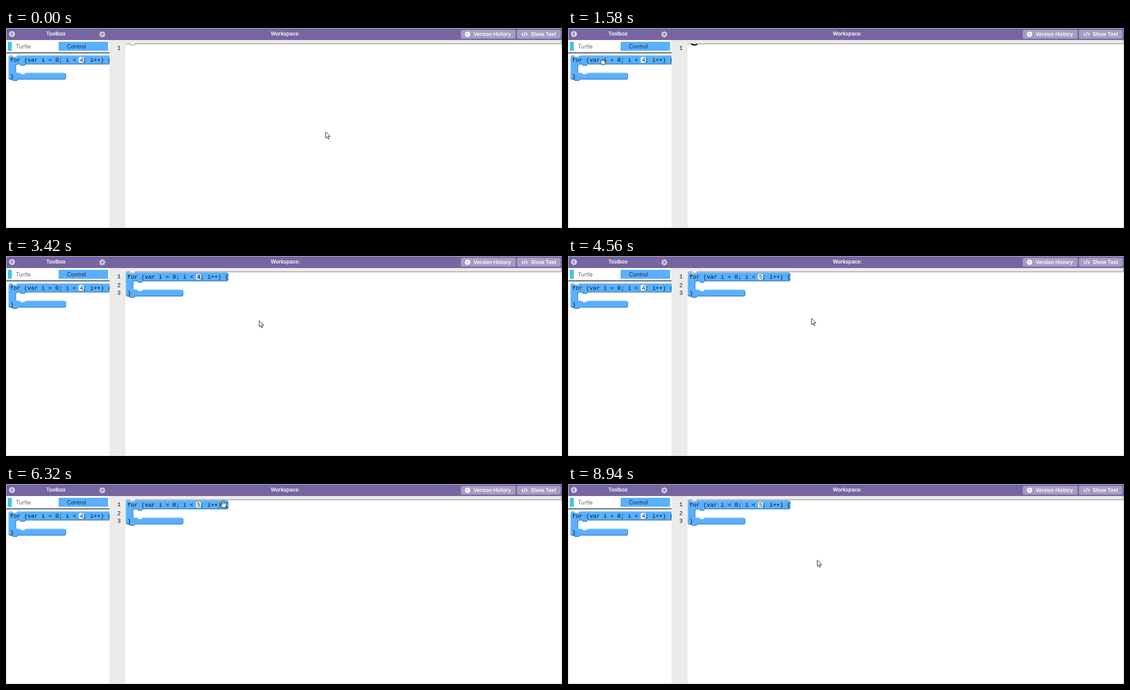
Write an HTML page that moves like this. It is 1247 by 449 pixels and loops after 9000 ms.

```html
<!DOCTYPE html>
<html lang="en">
<head>
<meta charset="utf-8">
<title>Block workspace</title>
<style>
  html, body { margin: 0; width: 100%; height: 100%; overflow: hidden; background: #fff; }
  svg { display: block; }
  text { white-space: pre; }
  .ui { font: 600 11.3px Inter, sans-serif; fill: #fff; }
  .tab { font: 400 12.4px Inter, sans-serif; }
  .code { font: 13px "Courier New", "Liberation Mono", monospace; fill: #111; }
  .ghost { opacity: .86; filter: drop-shadow(5px 5px 3px rgba(0, 0, 0, .55)); }
  .line { fill: none; stroke-width: 1.3; }
</style>
</head>
<body>
<svg id="stage" width="1247" height="449" viewBox="0 0 1247 449"></svg>
<script>
const LOOP = 9000, PRESS = 1400, LIFT = 1600, DROP = 2250, SELECT = 2720, TYPE = 3980;
const BLUE = '#59b0ff', PURPLE = '#7665a0', PALE = '#a69bc1';

const OUTLINE = 'M1,4 L3,1 H8 L11,4 H18 L21,1 H228 L230,3 V18 L228,20 H39 L36,23 H29 L26,20 H20 ' +
  'L17,23 V37 L20,40 H26 L29,43 H36 L39,40 H127 L129,42 V52 L127,54 H22 L19,57 H11 L8,54 H3 L1,52 Z';
const LIGHT = 'M1,52 V4 L3,1 H8 L11,4 H18 L21,1 H228 M17,37 L20,40 H26 L29,43 H36 L39,40 H127';
const DARK = 'M230,3 V18 L228,20 H39 L36,23 H29 L26,20 H20 L17,23 V37 ' +
  'M129,42 V52 L127,54 H22 L19,57 H11 L8,54 H3 L1,52';

// cursor path: time, x, y
const PATH = [
  [0, 716.5, 233], [300, 716.5, 233], [450, 722, 244], [1160, 72, 78], [1400, 66, 72],
  [1520, 70, 73], [1580, 78, 76], [2020, 348, 63], [2180, 334, 52], [2300, 332, 50],
  [2640, 432, 48], [2760, 432, 48], [3040, 567.5, 145], [3980, 567.5, 145],
  [4120, 567.5, 148], [4450, 567.5, 148], [5080, 300, 50], [5400, 288, 43.5],
  [6320, 488, 45.5], [6950, 300, 46], [7660, 480, 46], [8350, 558.5, 170.5], [9000, 558.5, 170.5]
];

const rect = (x, y, w, h, fill, r = 0) =>
  `<rect x="${x}" y="${y}" width="${w}" height="${h}" rx="${r}" fill="${fill}"/>`;
const text = (x, y, cls, s, extra = '') => `<text x="${x}" y="${y}" class="${cls}" ${extra}>${s}</text>`;
const mid = 'text-anchor="middle"';

const block = (id, x, y, cls = '') => `
  <g id="${id}" class="${cls}" transform="translate(${x} ${y})">
    <path d="${OUTLINE}" fill="${BLUE}"/>
    <path d="${LIGHT}" class="line" stroke="#8ac6fb"/>
    <path d="${DARK}" class="line" stroke="#2f76b8"/>
    ${rect(158, 4, 11, 13, '#fff', 4)}
    <rect class="mark" x="160" y="5" width="8" height="11" fill="#b5bff5" visibility="hidden"/>
    ${text(4.2, 15, 'code', 'for (var i = 0; i &lt; <tspan class="num">4</tspan>; i++) {')}
    ${text(4.8, 52, 'code', '}')}
  </g>`;

const teeth = Array.from({ length: 8 }, (_, i) =>
  `<rect x="-1.5" y="-7" width="3" height="4" rx=".6" transform="rotate(${i * 45})"/>`).join('');

document.getElementById('stage').innerHTML = `
  <clipPath id="box"><rect x="1" y="57" width="231" height="391"/></clipPath>
  ${rect(0, 0, 1247, 449, '#fff')}
  ${rect(0, 1, 1247, 26, PURPLE)}
  ${rect(232, 1, 1, 26, '#6a5a92')}
  ${rect(232, 27, 36, 421, '#ebebeb')}
  ${rect(268, 27, 978, 8, '#ebebeb')}

  <circle cx="13.5" cy="13.5" r="6.6" fill="#ddd8e8"/>
  <path d="M15,10 L11.5,13.5 L15,17" fill="none" stroke="${PURPLE}" stroke-width="2"/>
  <g transform="translate(216 14.3)" fill="#d3cde1">${teeth}<circle r="5.2"/><circle r="2.3" fill="${PURPLE}"/></g>
  ${text(112, 17.3, 'ui', 'Toolbox', mid)}
  ${text(626.5, 17.3, 'ui', 'Workspace:', mid)}

  ${rect(1020, 4, 123, 20, PALE, 4)}
  <circle cx="1035.2" cy="14" r="6" fill="#fff"/>
  <path d="M1035.5,10.5 V14.5 H1032" fill="none" stroke="${PALE}" stroke-width="1.6"/>
  ${text(1090.5, 18, 'ui', 'Version History', mid)}
  ${rect(1146, 4, 98, 20, PALE, 4)}
  <path d="M1160,10.5 L1156.8,14 L1160,17.5 M1166.2,10.5 L1169.4,14 L1166.2,17.5 M1164.5,9 L1161.7,19"
    fill="none" stroke="#fff" stroke-width="1.6"/>
  ${text(1205.5, 18, 'ui', 'Show Text', mid)}

  ${rect(4, 31, 9, 20, '#43c4e3')}
  ${text(22, 45.5, 'tab', 'Turtle', 'fill="#666"')}
  ${rect(118, 31, 111, 20, BLUE)}
  ${text(158, 45.5, 'tab', 'Control', mid + ' fill="#1d2b3a"')}
  ${rect(1, 55, 231, 1.6, '#111')}
  <g clip-path="url(#box)">${block('tool', 5, 61)}</g>

  <path d="M268,38 L271,35.5 H278 L281,38.5 H287 L290,35.5 H1245.5 V28" fill="none" stroke="#909090" stroke-width="1.4"/>
  ${rect(269, 36.5, 8, 2, '#fff')}
  <path id="slot" d="M276.5,35.5 Q279,38 283.5,38 Q288,38 290,35.5" fill="none" stroke="#000" stroke-width="2.8"/>
  <path id="glow" d="M272.5,36 H276 L280,39 H286 L290,36 H307" fill="none" stroke="#fff200"
    stroke-width="9" stroke-linecap="round" stroke-linejoin="round"/>
  <g id="lines">
    ${text(249.6, 49, 'code', '1', 'id="one"')}
    <g id="more">${text(249.6, 69.5, 'code', '2')}${text(249.6, 87, 'code', '3')}</g>
  </g>
  ${block('placed', 268, 36)}
  ${block('drag', 0, 0, 'ghost')}

  <path d="M.5,0 V448.5 H1246.5 V27 M0,.5 H1247" fill="none" stroke="#ccc"/>

  <g id="cursor" stroke="#000" fill="#fff" stroke-linejoin="round" stroke-linecap="round">
    <path id="arrow" d="M.5,.5 V14.2 L3.7,11.2 L6,16.4 L8.2,15.4 L6,10.3 H10.2 Z"/>
    <g id="open">
      <path d="M-3,7.3 L-3.4,5 L-6.4,1.2 Q-7,-.6 -5.2,-.5 L-3.4,1.2 L-4.9,-4 Q-4.8,-5.9 -3.1,-5
        L-2,-6.3 Q-.9,-7.6 .3,-6.4 Q1.9,-7.6 2.8,-5.8 L3.2,-4.9 Q5,-5.4 5.2,-3.5 L5.6,-2.4
        Q7,-2.2 6.6,0 L5.6,4 L4.4,7.3 Z"/>
      <path d="M-3,-4.5 L-1.7,-.4 M.3,-6 L.7,-.5 M3.2,-4.6 L2.9,-.4" fill="none"/>
    </g>
    <g id="fist">
      <path d="M-2.6,6 L-3,4.3 L-5.2,1.5 Q-5.6,-.7 -4,-1 L-4.2,-3 Q-3.4,-5 -1.6,-4.2
        Q0,-5.6 1.4,-4.2 Q3.2,-4.8 3.9,-3 Q5.6,-3 5.6,-.8 L5,3.4 L4,6 Z"/>
      <path d="M-1.5,-3.5 V-2 M1.3,-3.6 V-2 M3.8,-2.8 V-1.6" fill="none"/>
    </g>
  </g>`;

const el = id => document.getElementById(id);
const show = (node, on) => node.setAttribute('visibility', on ? 'visible' : 'hidden');
const move = (node, x, y) => node.setAttribute('transform', `translate(${x} ${y})`);
const mark = document.querySelector('#placed .mark');
const num = document.querySelector('#placed .num');

function pointer(t) {
  let i = 1;
  while (i < PATH.length - 1 && PATH[i][0] < t) i++;
  const [t0, x0, y0] = PATH[i - 1], [t1, x1, y1] = PATH[i];
  const p = (t - t0) / (t1 - t0), e = p * p * (3 - 2 * p);
  return [x0 + (x1 - x0) * e, y0 + (y1 - y0) * e];
}

function overBlock(x, y, left, top) {
  const u = x - left, v = y - top;
  return u > 1 && v > 1 && (u < 230 && v < 20 || u < 17 && v < 54 || u < 129 && v > 40 && v < 54);
}

function draw(t) {
  const [x, y] = pointer(t);
  const held = t >= PRESS && t < DROP, dragging = t >= LIFT && t < DROP, done = t >= DROP;
  const near = dragging && x > 290;
  const hover = overBlock(x, y, 5, 61) && x < 232 || done && overBlock(x, y, 268, 36);

  move(el('cursor'), x, y);
  show(el('fist'), held);
  show(el('open'), !held && hover);
  show(el('arrow'), !held && !hover);

  move(el('drag'), x - 61, y - 12);
  el('drag').style.display = dragging ? '' : 'none';
  el('placed').style.display = done ? '' : 'none';
  show(el('slot'), t >= 1500 && t < DROP && !near);
  show(el('glow'), near);
  show(el('more'), done);
  el('one').setAttribute('y', done ? 50 : 49);

  mark.style.visibility = t >= SELECT && t < TYPE ? 'visible' : 'hidden';
  num.textContent = t < TYPE ? '4' : '5';
}

function tick(now) {
  draw(now % LOOP);
  requestAnimationFrame(tick);
}
draw(0);
requestAnimationFrame(tick);
</script>
</body>
</html>
```
